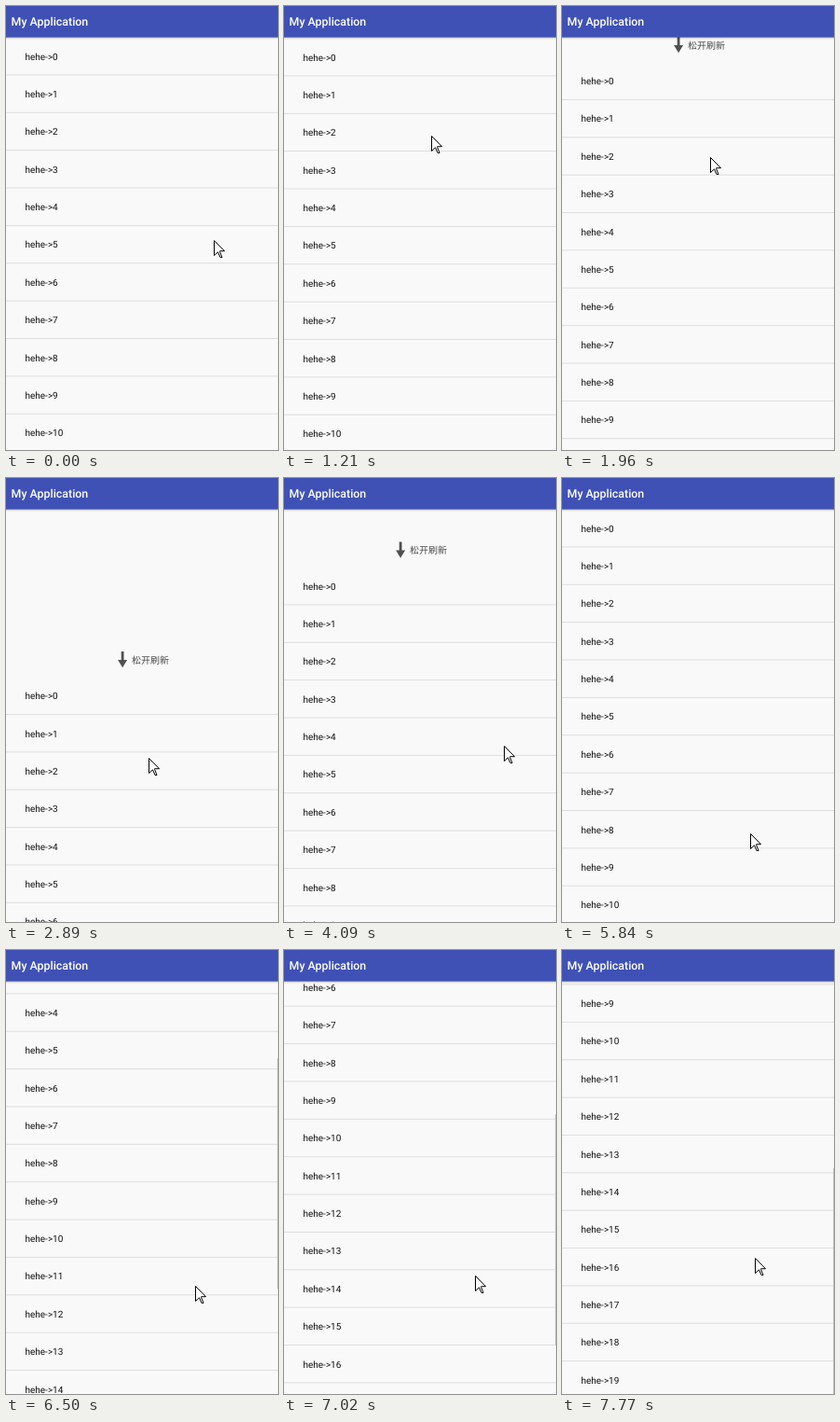
An HTML page that plays this animation: 292 px wide and 476 px high, repeating every 8000 ms.

```html
<!DOCTYPE html>
<html lang="zh-CN">
<head>
<meta charset="utf-8">
<style>
  html, body { margin: 0; width: 100%; height: 100%; overflow: hidden; background: #fafafa; }
  svg { display: block; }
  text {
    font-family: Roboto, "Noto Sans CJK SC", "Noto Sans CJK", sans-serif;
    text-rendering: geometricPrecision;
  }
</style>
</head>
<body>
<svg width="292" height="476" viewBox="0 0 292 476">
  <defs>
    <linearGradient id="shade" x2="0" y2="1">
      <stop stop-opacity=".25"/>
      <stop offset="1" stop-opacity="0"/>
    </linearGradient>
  </defs>
  <rect width="292" height="476" fill="#f9f9f9"/>
  <g id="list">
    <path d="M123.7 6.5h2.8v9h3.6l-5 8.2l-5-8.2h3.6z" fill="#505050"/>
    <text x="135" y="19.2" font-size="10" fill="#4a4a4a">松开刷新</text>
  </g>
  <rect id="bar" x="291" width="1" height="247" fill="#c8c8c8"/>
  <rect y="33" width="292" height="3" fill="url(#shade)"/>
  <rect width="292" height="33.6" fill="#3f51b5"/>
  <text x="5.6" y="21.3" font-size="12.4" font-weight="500" fill="#fff">My Application</text>
  <path id="cursor" d="M.5 .5V16.5L4.5 12.8L7 18.5H9L6.6 12.5V11.7H11.5Z" fill="#fff" stroke="#000"/>
</svg>
<script>
const LOOP = 8000, STEP = 120, PITCH = 40.37, ROWS = 20;
const $ = id => document.getElementById(id);

for (let i = 0; i < ROWS; i++) $('list').insertAdjacentHTML('beforeend', `
  <text x="20.5" y="${57.6 + i * PITCH}" font-size="10" fill="#111">hehe-&gt;${i}</text>
  <rect y="${73.4 + i * PITCH}" width="292" height="1" fill="#dedede"/>`);

// Corners of the pointer's path: [time, x, y]
const path = [[0, 223, 251], [310, 223, 251], [430, 205, 229], [940, 157, 276],
  [1210, 158, 139], [1960, 159, 162], [2740, 153, 299], [2890, 153, 300], [3310, 153, 300],
  [3940, 199, 270], [4090, 236, 287], [4360, 252, 335], [4600, 239, 371], [5140, 264, 331],
  [5840, 202, 381], [6500, 203, 360], [7770, 207, 330], [LOOP, 207, 330]];

// Pointer held in even steps along each leg of the path
function pointerAt(now) {
  const k = path.findIndex(p => p[0] > now) - 1;
  const [start, x, y] = path[k], [end, x2, y2] = path[k + 1];
  const last = Math.floor((end - start) / STEP) - 1;
  const t = start + STEP * Math.min(last, Math.floor((now - start) / STEP));
  const p = (t - start) / (end - start);
  return { t, x: Math.round(x + (x2 - x) * p), y: Math.round(y + (y2 - y) * p) };
}

// Decays from 1 to 0
const settle = (t, start, length) => (1 - Math.min(1, (t - start) / length)) ** 2;

function offsetAt({ t, y }) {
  if (t < 1210) return 0;
  if (t <= 2890) return 1.109 * (y - 138.1);               // pulled by the pointer
  if (t < 4600) return 62 + 117.5 * settle(t, 2890, 240);  // snaps to the refresh header
  if (t < 5840) return 62 * settle(t, 4600, 500);          // header closes
  return -Math.min(359.9, 0.2245 * (t - 5840));            // scrolls down the list
}

function draw(now) {
  const pointer = pointerAt(now), offset = offsetAt(pointer);
  $('list').setAttribute('transform', `translate(0 ${offset})`);
  $('cursor').setAttribute('transform', `translate(${pointer.x} ${pointer.y})`);
  $('bar').setAttribute('y', 34 - offset * 0.555);
  $('bar').setAttribute('visibility', offset < 0 ? 'visible' : 'hidden');
}

const origin = performance.now();
function tick() {
  draw((performance.now() - origin) % LOOP);
  requestAnimationFrame(tick);
}
tick();
</script>
</body>
</html>
```
